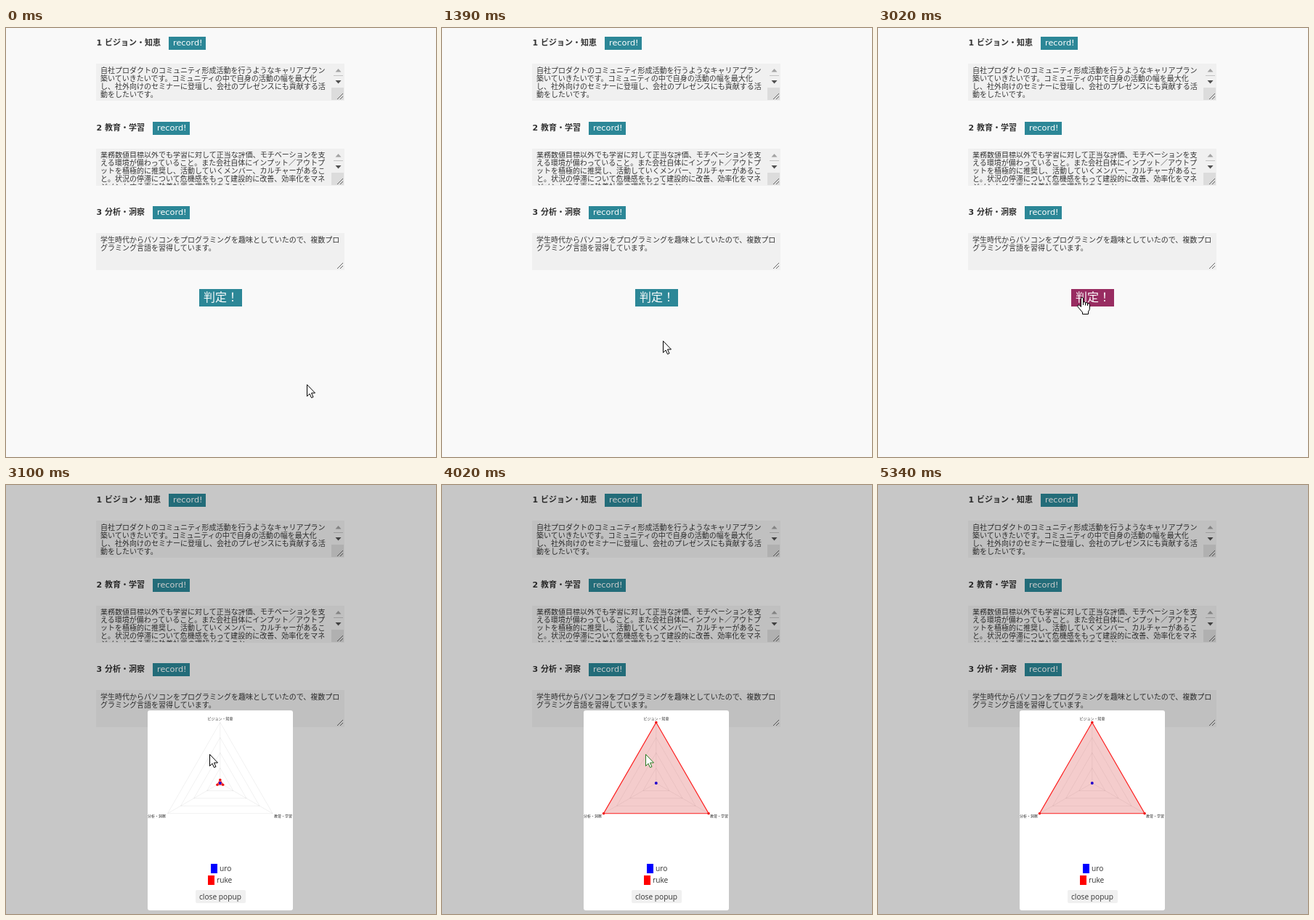
An HTML page for the animation above (6.97 s loop, 592 by 590 pixels).

```html
<!DOCTYPE html>
<html lang="ja">
<head>
<meta charset="utf-8">
<style>
  html, body { margin: 0; width: 100%; height: 100%; overflow: hidden; background: #f9f9f9; }
  #stage { display: block; width: 592px; height: 590px; }
  text { font-family: "Noto Sans CJK JP", "Noto Sans CJK", sans-serif; fill: #333; }
  .area { font-size: 10px; }
  .heading { font-size: 11px; font-weight: bold; }
  .number { font: bold 11px "DejaVu Sans", sans-serif; }
  .record { font: 11.3px "DejaVu Sans", sans-serif; fill: #fff; }
  .small { font: 10.2px "Open Sans", sans-serif; }
  .axis { font-size: 5px; text-anchor: middle; }
  .judge { font-size: 16px; fill: #fff; }
  .cursor { fill: #fff; stroke: #000; }
</style>
</head>
<body>
<svg id="stage" viewBox="0 0 592 590">
  <g id="form"></g>
  <rect id="judge" x="266" y="359" width="59" height="24"/>
  <text class="judge" x="272" y="376">判定！</text>

  <g id="popup">
    <rect width="592" height="590" fill="#000" opacity=".2"/>
    <rect x="195" y="310" width="200" height="275" rx="3" fill="#fff"/>
    <path id="grid" fill="none" stroke="#000" stroke-opacity=".06"/>
    <text class="axis" x="295" y="323">ビジョン・知恵</text>
    <text class="axis" x="207.5" y="457">分析・洞察</text>
    <text class="axis" x="381.5" y="457">教育・学習</text>
    <path id="series" fill="#c80000" fill-opacity=".2" stroke="#f22" stroke-width="1.2"/>
    <g id="dots" fill="#f01818"><circle r="1.8"/><circle r="1.8"/><circle r="1.8"/></g>
    <circle cx="294.8" cy="410" r="2" fill="#20c"/>
    <rect x="282" y="521" width="9" height="13" fill="#00f"/>
    <text class="small" x="294" y="531">uro</text>
    <rect x="278" y="537" width="9" height="13" fill="#f00"/>
    <text class="small" x="290" y="547">ruke</text>
    <rect x="261" y="557" width="69" height="18" rx="2" fill="#f0f0f0"/>
    <text class="small" x="266" y="570">close popup</text>
  </g>

  <g id="ring" fill="none">
    <circle cx="280" cy="370" r="10.8" stroke="#000"/>
    <circle cx="280" cy="370" r="9.8" stroke="#fff"/>
  </g>
  <path id="arrow" class="cursor" d="M.5 .5V16.5L4 13L6.5 18.5L9 17.5L6.5 12H11.5Z"/>
  <path id="hand" class="cursor" transform="translate(274 370)" d="M5.5 13.5V2Q5.5 .5 7 .5T8.5 2V7Q11 5.5 11.5 8Q14 6.5 14.5 9Q17 8 17.5 10.5V15Q17.5 18 15.5 20V23.5H7.5V21L1.5 14Q0 12 1.5 11Q3 10 5.5 13.5ZM8.5 7V11M11.5 8V11.5M14.5 9V12"/>
</svg>
<script>
const LOOP = 6970, TICK = 76.9, CLICK = 2870, RELEASE = 3020, OPEN = 3100;
const TEAL = '#2c8797', PURPLE = '#982c61';
const CENTER = [294.8, 410], RADIUS = 83.5;
const el = id => document.getElementById(id);
const show = (id, on) => el(id).setAttribute('display', on ? 'inline' : 'none');

const sections = [
  { y: 12, title: 'ビジョン・知恵', buttonX: 224, scroll: true, baseline: 13, lines: [
    '自社プロダクトのコミュニティ形成活動を行うようなキャリアプラン',
    '築いていきたいです。コミュニティの中で自身の活動の幅を最大化',
    'し、社外向けのセミナーに登壇し、会社のプレゼンスにも貢献する活',
    '動をしたいです。'] },
  { y: 129, title: '教育・学習', buttonX: 202, scroll: true, baseline: 12, lines: [
    '業務数値目標以外でも学習に対して正当な評価、モチベーションを支',
    'える環境が備わっていること。また会社自体にインプット／アウトプ',
    'ットを積極的に推奨し、活動していくメンバー、カルチャーがあるこ',
    'と。状況の停滞について危機感をもって建設的に改善、効率化をマネ',
    'ジメントする事に執着社風の理解があること'] },
  { y: 245, title: '分析・洞察', buttonX: 202, scroll: false, baseline: 13, lines: [
    '学生時代からパソコンをプログラミングを趣味としていたので、複数プロ',
    'グラミング言語を習得しています。'] }
];

const scrollbar = `
  <path d="M329.5 11.5L333.5 7L337.5 11.5Z" fill="#a3a3a3"/>
  <path d="M327 16.5H340" stroke="#c4c4c4"/>
  <path d="M329.5 23L333.5 27.5L337.5 23Z" fill="#505050"/>
  <rect x="324" y="33" width="17" height="17" fill="#dcdcdc"/>`;

el('form').innerHTML = sections.map((s, i) => `
  <text class="number" x="124.5" y="${s.y + 12}">${i + 1}</text>
  <text class="heading" x="136" y="${s.y + 12}">${s.title}</text>
  <rect x="${s.buttonX}" y="${s.y}" width="51" height="18" fill="${TEAL}"/>
  <text class="record" x="${s.buttonX + 6}" y="${s.y + 12}">record!</text>
  <rect x="124" y="${s.y + 37}" width="342" height="51" fill="#f0f0f0"/>
  <svg x="124" y="${s.y + 41}" width="342" height="46" viewBox="0 4 342 46">
    ${s.lines.map((line, n) =>
      `<text class="area" x="6" y="${s.baseline + n * 11.1}">${line}</text>`).join('')}
  </svg>
  <g transform="translate(124 ${s.y + 37})">
    ${s.scroll ? scrollbar : ''}
    <path d="M332 49L340 41M336 49L340 45" stroke="#666"/>
  </g>`).join('');

const corners = r => [-90, 30, 150].map(deg => {
  const a = deg * Math.PI / 180;
  return [CENTER[0] + r * Math.cos(a), CENTER[1] + r * Math.sin(a)];
});
const triangle = r => `M${corners(r).join('L')}Z`;
el('grid').setAttribute('d',
  [1, 2, 3, 4].map(n => triangle(RADIUS * n / 4)).join('') +
  corners(RADIUS).map(p => `M${CENTER}L${p}`).join(''));

// Pointer positions as [start time, x, y]
const pointer = [
  [0, 414, 490], [70, 412, 484],
  [600, 396, 476], [680, 362, 467], [760, 338, 464], [840, 328, 464],
  [1390, 304, 430], [1470, 290, 402], [1550, 284, 386], [1620, 281, 374], [1770, 280, 370],
  [4950, 290, 360], [5030, 335, 351], [5110, 405, 375], [5180, 480, 432], [5260, 554, 519],
  [5340, 700, 700]
];

function drawChart(t) {
  const steps = Math.floor((t - RELEASE) / TICK);
  const elapsed = RELEASE + steps * TICK - OPEN;
  const x = Math.min(1, Math.max(0, 0.0165 + elapsed / 1102));
  const r = RADIUS * (1 - (1 - x) ** 4);
  el('series').setAttribute('d', triangle(r));
  corners(r).forEach(([cx, cy], i) => {
    el('dots').children[i].setAttribute('cx', cx);
    el('dots').children[i].setAttribute('cy', cy);
  });
}

function draw(t) {
  const [, x, y] = pointer.findLast(p => p[0] <= t);
  const open = t >= RELEASE + TICK;
  const hover = !open && y < 383;

  el('judge').setAttribute('fill', hover ? PURPLE : TEAL);
  show('popup', open);
  show('ring', t >= CLICK && t < RELEASE);
  show('hand', hover);
  show('arrow', !hover);
  el('arrow').setAttribute('transform', `translate(${x} ${y})`);
  el('arrow').style.stroke = t > 3400 && t < 4950 ? '#287a20' : '#000';
  if (open) drawChart(t);
}

const start = performance.now();
function frame() {
  draw((performance.now() - start) % LOOP);
  requestAnimationFrame(frame);
}
frame();
</script>
</body>
</html>
```
